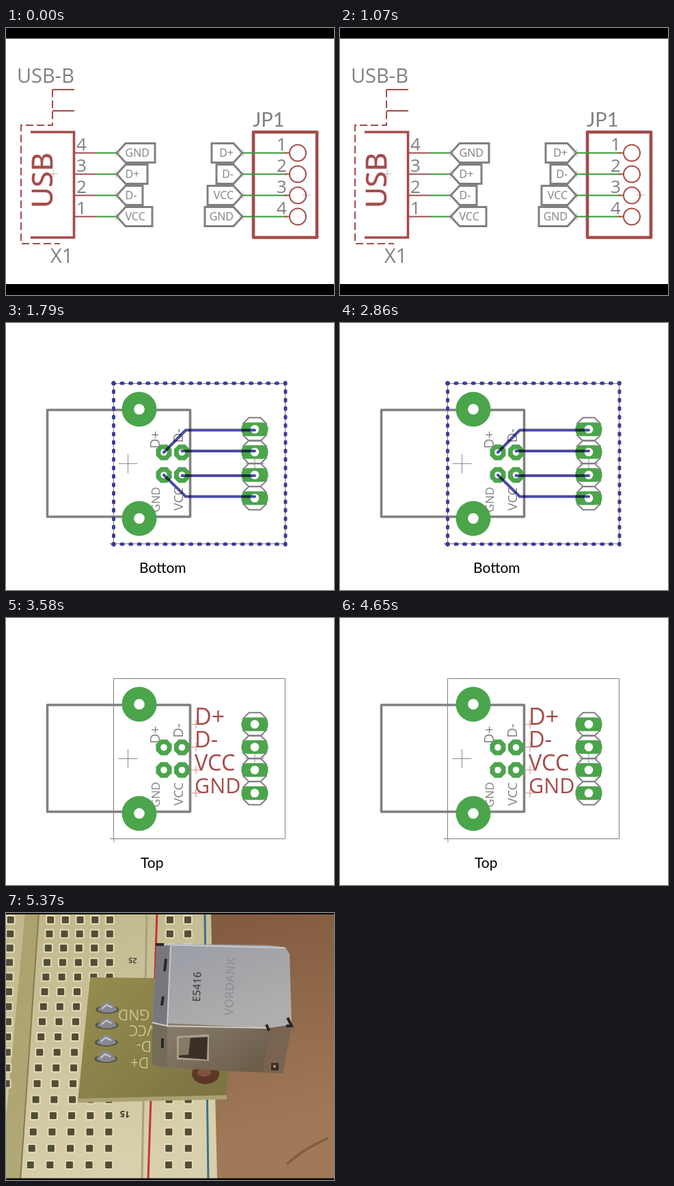
Animation of 480 by 390 pixels, one loop 7.16 s. Source, as an HTML page:

```html
<!DOCTYPE html>
<html lang="en">
<head>
<meta charset="utf-8">
<title>USB-B breakout board</title>
<style>
html, body { margin: 0; width: 100%; height: 100%; overflow: hidden; background: #fff; }
svg { display: block; width: 480px; height: 390px; }
text { font-family: "Open Sans", "Noto Sans", sans-serif; }
.lato { font-family: Lato, sans-serif; }
.wire { mix-blend-mode: multiply; }
</style>
</head>
<body>
<svg id="stage" viewBox="0 0 480 390"></svg>
<script>
const GRAY = '#808080', RED = '#a54b4b', GREEN = '#4ba54b', LEAF = '#339a33', BLUE = '#4b4ba5';

const path = (d, stroke, width, extra = '') =>
  `<path d="${d}" fill="none" stroke="${stroke}" stroke-width="${width}" ${extra}/>`;
const shape = (d, fill, extra = '') => `<path d="${d}" fill="${fill}" ${extra}/>`;
const rect = (x, y, w, h, fill, extra = '') =>
  `<rect x="${x}" y="${y}" width="${w}" height="${h}" fill="${fill}" ${extra}/>`;
const circle = (x, y, r, fill, extra = '') =>
  `<circle cx="${x}" cy="${y}" r="${r}" fill="${fill}" ${extra}/>`;
const ellipse = (x, y, rx, ry, fill) =>
  `<ellipse cx="${x}" cy="${y}" rx="${rx}" ry="${ry}" fill="${fill}"/>`;
const text = (s, x, y, size, fill, turn = 0, extra = '') =>
  `<text transform="translate(${x} ${y}) rotate(${turn})" font-size="${size}" fill="${fill}" ${extra}>${s}</text>`;
const cross = (x, y, r, color = GRAY) =>
  path(`M${x - r} ${y}h${2 * r}M${x} ${y - r}v${2 * r}`, color, 0.9);
const octagon = (x, y, r, cut) => {
  const s = 2 * (r - cut);
  return `M${x - r + cut} ${y - r}h${s}l${cut} ${cut}v${s}l${-cut} ${cut}h${-s}l${-cut} ${-cut}v${-s}z`;
};

function schematic() {
  let s = rect(0, 0, 480, 390, '#fff') + rect(0, 0, 480, 15.5, '#000') + rect(0, 374, 480, 16, '#000');
  s += text('USB-B', 16, 80, 29, GRAY) + text('JP1', 361, 144, 29, GRAY, 0, 'class="lato"') +
    text('X1', 65, 343, 29, GRAY);
  s += text('USB', 68, 263, 42, RED, -90, `stroke="${RED}" stroke-width=".7"`);
  s += path('M36 152H99.5V306H36', RED, 3.6) + path('M100 90H68M100 121H68', RED, 2);
  s += path('M68 90V142H22V315H79', RED, 2, 'stroke-dasharray="11 5"');
  s += path('M362 152H455V306H362z', RED, 4.6, 'stroke-linejoin="round"');
  s += cross(69, 213, 6, '#aaa') + cross(440, 244, 6, '#aaa');

  const left = [['GND', 218], ['D+', 207], ['D-', 200], ['VCC', 214]];
  const right = [['D+', 301], ['D-', 308], ['VCC', 295], ['GND', 291]];
  for (let i = 0; i < 4; i++) {
    const y = 182.5 + 31 * i;
    const [a, edgeA] = left[i], [b, edgeB] = right[i];
    s += cross(161, y, 6, '#bbb') + cross(347, y, 6, '#bbb');
    s += path(`M99 ${y}H131`, RED, 2) + path(`M131 ${y}H161M347 ${y}H410`, LEAF, 2);
    s += path(`M408 ${y}H416`, RED, 2) + circle(427, y, 12, 'none', `stroke="${RED}" stroke-width="2"`);
    s += path(`M162 ${y}l13 -14H${edgeA}v28H175z`, GRAY, 3);
    s += path(`M346 ${y}l-13 -14H${edgeB}v28H333z`, GRAY, 3);
    s += text(a, 174.5, y + 5.7, 16, GRAY) + text(b, 333, y + 5.7, 16, GRAY, 0, 'text-anchor="end"');
    s += text(4 - i, 103, y - 4, 26, GRAY) + text(i + 1, 396, y - 4, 26, GRAY);
  }
  return s;
}

const pinRows = [155.3, 188.5, 222, 255.8];

function board() {
  let s = rect(0, 0, 480, 390, '#fff');
  s += path('M157.5 88.5H408.5V322.5H157.5zM152 322.5h6v5', GRAY, 1);
  s += path('M60.5 127H269.5V283H60.5z', GRAY, 3.6, 'stroke-linejoin="round"');
  s += cross(178.5, 205.5, 14) + cross(364, 205, 14);
  for (const y of [126, 285.5]) s += circle(195, y, 25.5, GREEN) + circle(195, y, 7.8, '#fff');
  for (const y of [189, 222])
    for (const x of [231, 257.5]) s += shape(octagon(x, y, 11.5, 6.7), GREEN) + circle(x, y, 4.8, '#fff');
  s += path(pinRows.map(y => octagon(364, y, 17, 8.5)).join(''), GRAY, 2);
  for (const y of pinRows) s += rect(344.5, y - 10, 39, 20, GREEN, 'rx="8"') + circle(364, y, 6.3, '#fff');
  s += text('D+', 225, 183.5, 20, GRAY, -90) + text('D-', 258.5, 175, 20, GRAY, -90);
  s += text('GND', 225, 276.5, 16.8, GRAY, -90) + text('VCC', 258.5, 274, 18.7, GRAY, -90);
  return s;
}

function bottomLayer() {
  // Dash periods fit 20 steps across and 19 steps down.
  const dotted = (d, step) =>
    path(d, '#3c3c9c', 5, `stroke-linecap="round" stroke-dasharray="2 ${step - 2}"`);
  let s = dotted('M156.5 88H409M156.5 323H409', 251.5 / 20) + dotted('M157.5 87V324M409 87V324', 235 / 19);
  s += path('M231 189L263 156.5H364M257.5 187H364M257.5 223H364M231 222L263 253.5H364',
    BLUE, 4, 'stroke-linecap="round" stroke-linejoin="round" class="wire"');
  return s + text('Bottom', 195, 365, 21, '#000', 0, 'class="lato"');
}

function topLayer() {
  const labels = [['D+', 34], ['D-', 32.5], ['VCC', 32.5], ['GND', 30.5]];
  return labels.map(([label, size], i) =>
    cross(278, pinRows[i], 6.5, '#c08080') + text(label, 276, pinRows[i] + 0.5, size, RED)).join('') +
    text('Top', 197, 365, 21, '#000', 0, 'class="lato"');
}

function photo() {
  const gradient = (id, a, b, dir) => `<linearGradient id="${id}" ${dir}>` +
    `<stop stop-color="${a}"/><stop offset="1" stop-color="${b}"/></linearGradient>`;
  let s = '<defs>' + gradient('wood', '#7b543a', '#a07a58', 'x2=".3" y2="1"') +
    gradient('cream', '#bfb68a', '#d8d0ac', 'x2=".3" y2="1"') +
    gradient('metal', '#999ca6', '#b0aeac', 'x2=".6" y2="1"') +
    gradient('front', '#8b8170', '#6b5c48', 'x2="1" y2=".5"') +
    gradient('pcb', '#968d4f', '#7d7542', 'x2="1" y2=".7"') + '</defs>';
  s += rect(0, 0, 480, 390, 'url(#wood)');
  s += path('M412 366Q428 352 440 345T470 329', '#6b452c', 4, 'opacity=".5" stroke-linecap="round"');
  s += shape('M0 0H300L309 390H0z', 'url(#cream)');
  s += shape('M28 0H48L22 390H0V300z', '#a39963', 'opacity=".7"') + path('M48 0L21 390', '#857c50', 2);
  s += path('M206 0L199 390', '#a9a17c', 3);
  s += path('M221 0L208 390', '#c0363b', 3) + path('M291 0L296 390', '#39718f', 3);

  const hole = (x, y) => rect(x - 7, y - 7, 14, 14, '#e3dcb9', 'rx="2"') + rect(x - 5, y - 5, 10, 10, '#524d35', 'rx="1"');
  for (let y = 10, row = 0; y < 385; y += 20.5 + row++ * 0.25) {
    const k = y / 390;
    for (let c = 0; c < 5; c++) s += hole(66 - 32 * k + c * (21.5 + 7.5 * k), y);
    if (y < 260) s += hole(7 - 10 * k, y);
    s += hole(240 - 2 * k, y) + hole(266 + k, y);
  }
  s += text('25', 192, 66, 11, '#4b483a', 185, 'font-weight="700"') +
    text('15', 182, 290, 13, '#38372c', 185, 'font-weight="700"');

  s += shape('M123 94L216 95L325 205L323 270L105 276z', 'url(#pcb)');
  s += path('M105 274L323 269', '#aaa172', 6);
  for (const [label, x, y] of [['GND', 164, 141], ['VCC', 180, 164], ['D-', 191, 187], ['D+', 182, 211]])
    s += text(label, x, y, 21, '#c9c196', 180, 'text-anchor="end"');
  for (const y of [138, 161, 186, 210]) {
    const x = 152 - y / 36;
    s += ellipse(x, y + 3, 17, 6, '#57523a');
    s += shape(`M${x - 14} ${y + 4}Q${x - 9} ${y - 5} ${x} ${y - 9}Q${x + 10} ${y - 5} ${x + 15} ${y + 4}Q${x} ${y + 11} ${x - 14} ${y + 4}z`, '#858890');
    s += path(`M${x - 8} ${y + 2}L${x - 1} ${y - 4}L${x + 7} ${y}`, '#c9ccd0', 2);
  }
  s += ellipse(292, 235, 20, 15, '#5d3827') + ellipse(290, 233, 10, 6, '#80523e');

  s += shape('M214 160L385 165L418 163L405 234L330 231L236 226L214 222z', 'url(#front)');
  s += shape('M385 167L418 163L405 234L376 233z', '#786450');
  s += shape('M214 162L236 165V226L214 221z', '#756b5b');
  s += shape('M250 180L297 177V216L250 214z', '#a99e8a') + shape('M253 183L295 181L294 214L253 211z', '#3a3027');
  s += shape('M253 183L270 182L267 207L253 208z', '#857963');
  s += shape('M221 45L384 47L409 50L415 60L418 163L385 168L214 160z', 'url(#metal)');
  s += shape('M221 45L241 47L236 166L214 160z', '#77777d') + path('M241 48L236 164', '#c9cace', 2);
  s += path('M222 46L408 51', '#c9cad0', 2) + path('M214 160L236 165L385 168', '#d0ccc4', 2);
  s += path('M219 46h12M234 67l-2 18M230 122l-2 13M229 183v14M381 163l4 9M412 153l6 12h-8', '#292623', 4);
  s += rect(388, 219, 11, 11, '#392f27') + rect(391, 222, 4, 4, '#98866f');
  s += text('E5416', 284, 130, 15.5, '#4b4a4b', -88, 'font-weight="600"');
  s += text('VORDANK', 332, 150, 17.5, '#919298', -88, 'font-weight="600"');
  return s + rect(0, 0, 480, 2, '#000') + rect(0, 387.5, 480, 2.5, '#000');
}

const base = board();
const scenes = [schematic(), base + bottomLayer(), base + topLayer(), photo()];
const stage = document.getElementById('stage');
stage.innerHTML = scenes.map(s => `<g>${s}</g>`).join('');
const groups = [...stage.children];

function draw(now) {
  const current = Math.floor(now % 7160 / 1790);
  groups.forEach((g, i) => g.style.display = i === current ? '' : 'none');
  requestAnimationFrame(draw);
}
draw(0);
</script>
</body>
</html>
```
